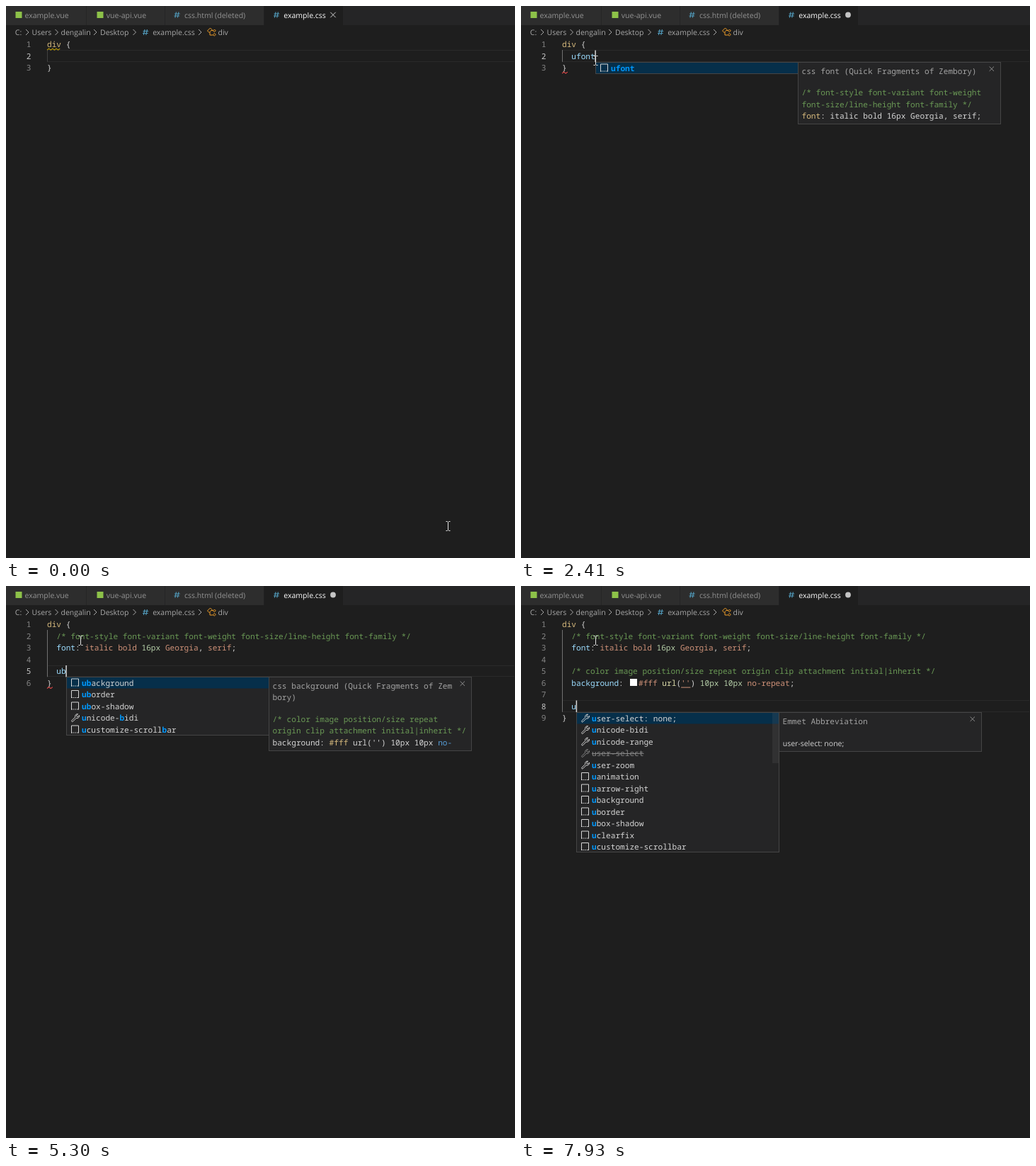
Animation, 719 px wide and 779 px high, one loop 8 s. Source, as an HTML page:

```html
<!DOCTYPE html>
<html lang="en">
<head>
<meta charset="utf-8">
<title>Snippet completion</title>
<style>
html, body { margin: 0; width: 100%; height: 100%; overflow: hidden; background: #1e1e1e; }
svg { display: block; width: 100vw; height: 100vh; }
text { white-space: pre; text-rendering: geometricPrecision; font-weight: 500; }
.ui { font-family: "Open Sans", "Noto Sans", sans-serif; font-size: 10.5px; }
.code { font-family: "Noto Sans Mono", "DejaVu Sans Mono", monospace; font-size: 11.13px; }
.hit { fill: #0097fb; font-weight: bold; }
.line { fill: none; stroke-width: 1; }
</style>
</head>
<body>
<svg viewBox="0 0 719 779">
  <rect width="719" height="779" fill="#1e1e1e"/>
  <rect width="719" height="27" fill="#252526"/>
  <path d="M0 0H113V27H0ZM114 0H224V27H114ZM225 0H364V27H225Z" fill="#2d2d2d"/>
  <rect x="364.5" width="111.5" height="27" fill="#1e1e1e"/>
  <g fill="#8dc149">
    <rect x="13.5" y="8" width="9" height="9"/>
    <rect x="128.5" y="8" width="9" height="9"/>
  </g>
  <g id="chrome"></g>
  <g id="editor"></g>
  <path id="mouse" class="line" stroke="#e4e4e4" d="M-3 -6.5H-.8M.8 -6.5H3M0 -6V6M-3 6.5H-.8M.8 6.5H3"/>
</svg>
<script>
const CW = 6.678, LH = 16.5, LEFT = 58, LOOP = 8000;
const $ = id => document.getElementById(id);
const color = {
  sel: '#d7ba7d', txt: '#d4d4d4', prop: '#9cdcfe', com: '#6a9955',
  val: '#ce9178', num: '#b5cea8', fn: '#dcdcaa', key: '#569cd6', dim: '#a3a3a3'
};
const top_ = row => 45.8 + LH * (row - 1);
const colX = col => LEFT + col * CW;
const size = tokens => tokens.reduce((n, [, s]) => n + s.length, 0);

const label = (x, y, s, fill) => `<text class="ui" x="${x}" y="${y}" fill="${fill}">${s}</text>`;
const code = (x, y, tokens) => `<text class="code" x="${x}" y="${y}">` +
  tokens.map(([c, s]) => `<tspan fill="${color[c] || c}">${s}</tspan>`).join('') + '</text>';
const box = (x, y, w, h, fill, stroke = 'none') =>
  `<rect x="${x}" y="${y}" width="${w}" height="${h}" fill="${fill}" stroke="${stroke}"/>`;
const line = (d, stroke, more = '') => `<path class="line" d="${d}" stroke="${stroke}" ${more}/>`;
const cross = (x, y, r, stroke) =>
  line(`M${x - r} ${y - r}L${x + r} ${y + r}M${x + r} ${y - r}L${x - r} ${y + r}`, stroke);
const hash = (x, y) => line(`M${x - 1} ${y - 4}l-1.6 8M${x + 2.4} ${y - 4}l-1.6 8M${x - 3.4} ${y - 1.5}h7.6M${x - 4} ${y + 1.5}h7.6`,
  '#519aba', 'style="stroke-width:1.2"');

function squiggle(row, cols, stroke) {
  const y = top_(row) + 16.3;
  let d = `M${LEFT} ${y}`;
  for (let x = 2.6, up = 1; x <= cols * CW; x += 2.6, up = !up) d += `L${LEFT + x} ${y - (up ? 2 : 0)}`;
  return line(d, stroke, 'style="stroke-width:1.1"');
}

// Tabs and breadcrumbs
const grey = '#949494', crumb = '#a9a9a9';
$('chrome').innerHTML =
  label(26.5, 16.5, 'example.vue', grey) + label(141.8, 16.5, 'vue-api.vue', grey) +
  label(252, 16.5, 'css.html (deleted)', grey) + label(392.3, 16.5, 'example.css', '#fff') +
  hash(241.5, 12.5) + hash(382, 12.5) + hash(197, 37) +
  [[12.8, 'C:'], [36.5, 'Users'], [77.5, 'dengalin'], [133, 'Desktop'], [207.2, 'example.css'], [299.5, 'div']]
    .map(([x, s]) => label(x, 40.8, s, crumb)).join('') +
  [28, 69.5, 124, 179.5, 272].map(x => line(`M${x} 33l4 4l-4 4`, crumb)).join('') +
  line('M284.5 35l4 -4l2.5 2.5l-4 4zM290 34.5h2.5M288 37v4h4.5M292.5 35l2 -2l1.8 1.8l-2 2zM292.5 40.5l2 -2l1.8 1.8l-2 2z', '#ee9d28');

// Document lines
const word = s => [['prop', s]];
const note = s => [['com', `/* ${s} */`]];
const fontNote = note('font-style font-variant font-weight font-size/line-height font-family');
const fontRule = [['prop', 'font'], ['txt', ':'], ['val', ' italic bold'], ['num', ' 16px'],
  ['val', ' Georgia'], ['txt', ','], ['val', ' serif'], ['txt', ';']];
const bgNote = note('color image position/size repeat origin clip attachment initial|inherit');
const bgName = [['prop', 'background'], ['txt', ': ']];
const bgValue = [['val', '#fff'], ['fn', ' url'], ['txt', '('], ['val', "''"], ['txt', ')'],
  ['num', ' 10px 10px'], ['val', ' no-repeat'], ['txt', ';']];
const bgRule = [...bgName, ...bgValue];
const one = [fontNote, fontRule];
const two = [...one, [], bgNote, bgRule];

// Completion lists, keyed by the typed word
const lists = {
  u: ['user-select: none;', 'unicode-bidi', 'unicode-range', 'user-select', 'user-zoom', 'uanimation',
    'uarrow-right', 'ubackground', 'uborder', 'ubox-shadow', 'uclearfix', 'ucustomize-scrollbar'],
  uf: ['ufont', 'uclearfix'], ufo: ['ufont'], ufon: ['ufont'], ufont: ['ufont'],
  ub: ['ubackground', 'uborder', 'ubox-shadow', 'unicode-bidi', 'ucustomize-scrollbar'],
  uba: ['ubackground', 'ucustomize-scrollbar'], ubac: ['ubackground'], uback: ['ubackground']
};
const docs = {
  emmet: { h: 55, title: ['Emmet Abbreviation'], plain: 'user-select: none;' },
  font: { h: 87, title: ['css font (Quick Fragments of Zembory)'], body: [
    [['com', '/* font-style font-variant font-weight']],
    [['com', 'font-size/line-height font-family */']],
    [['sel', 'font'], ['txt', ': italic bold 16px Georgia, serif;']]] },
  bg: { h: 104, title: ['css background (Quick Fragments of Zem', 'bory)'], body: [
    [['com', '/* color image position/size repeat']],
    [['com', 'origin clip attachment initial|inherit */']],
    [['txt', 'background: '], ['sel', '#fff'], ['txt', " url('') 10px 10px "], ['key', 'no-']]] }
};
const wrench = 'M1 9.7L5.7 5A3.4 3.4 0 0 1 9.6 .7L7.7 2.6L8.1 4.1L9.6 4.5L11.5 2.6A3.4 3.4 0 0 1 7.2 6.5L2.5 11.2A1 1 0 0 1 1 9.7Z';
const frame = 'M.5 11V.5H10.5V11M0 10.5h2M3 10.5h1.5M5.7 10.5h1.5M8.4 10.5h2';

function mark(s, query) {
  let i = 0;
  return [...s].map(c => c === query[i] ? (i++, `<tspan class="hit">${c}</tspan>`) : c).join('');
}

function popup(x, y, query) {
  const items = lists[query];
  const h = Math.round(items.length * LH - .6);
  let out = box(x, y, 286, h, '#252526') + box(x, y, 286, 16, '#062f4a') + box(x, y, 286, h, 'none', '#454545');
  items.forEach((s, i) => {
    const ry = y + i * LH, tool = /^u[sn]/.test(s), old = s === 'user-select';
    const ink = old ? '#858585' : '#d4d4d4';
    out += `<g transform="translate(${x + 6.5} ${ry + 2})">${line(tool ? wrench : frame, ink)}</g>`;
    out += `<text class="code" x="${x + 21.5}" y="${ry + 12.2}" fill="${ink}"` +
      `${old ? ' text-decoration="line-through"' : ''}>${old ? s : mark(s, query)}</text>`;
  });
  if (items.length > 11) out += box(x + 276.5, y + .5, 9, 71, 'rgba(121,121,121,.14)');
  return out;
}

function details(x, y, { h, title, body = [], plain }, bar) {
  let out = box(x, y, 286, h, '#252526', '#454545');
  title.forEach((s, i) => out += code(x + 5, y + 16 + i * LH, [['dim', s]]));
  const by = y + 46.6 + (title.length - 1) * LH;
  body.forEach((t, i) => out += code(x + 5, by + i * LH, t));
  if (plain) out += label(x + 5.2, y + 47.5, plain, color.txt);
  if (bar) out += box(x + 277, y + .5, 8.5, 88, 'rgba(121,121,121,.45)');
  return out + cross(x + 273.3, y + 9.2, 3.2, '#8c8c8c');
}

// Each step changes part of the editor state; the last body line is the active one
const steps = [
  [0, { body: [[]], caret: 0, warn: 1, err: 0, dirty: 0, list: '', doc: '', bar: 0, swatch: 0 }],
  [680, { caret: 1 }], [1150, { caret: 0 }], [1700, { caret: 1 }],
  [1870, { body: [word('u')], dirty: 1 }],
  [2020, { list: 'u', doc: 'emmet' }],
  [2100, { body: [word('uf')] }],
  [2180, { list: 'uf', doc: 'font' }],
  [2260, { body: [word('ufo')], list: 'ufo' }],
  [2330, { body: [word('ufon')], list: 'ufon', warn: 0, err: 1 }],
  [2410, { body: [word('ufont')], list: 'ufont' }],
  [2580, { body: one, list: '', doc: '' }],
  [3040, { caret: 0 }], [3270, { err: 0 }],
  [3420, { body: [...one, []], caret: 1 }],
  [3730, { body: [...one, [], []] }],
  [4200, { caret: 0 }],
  [4600, { body: [...one, [], word('u')], caret: 1 }],
  [4750, { list: 'u' }], [4830, { doc: 'emmet' }],
  [5070, { caret: 0, err: 1 }],
  [5300, { body: [...one, [], word('ub')], caret: 1, list: 'ub', doc: 'bg' }],
  [5380, { body: [...one, [], word('uba')], list: 'uba' }],
  [5530, { body: [...one, [], word('ubac')], list: 'ubac' }],
  [5680, { body: [...one, [], word('uback')], list: 'uback' }],
  [5760, { bar: 1 }],
  [6070, { body: two, list: '', doc: '', bar: 0 }],
  [6540, { caret: 0 }], [6690, { swatch: 1 }], [6770, { err: 0 }],
  [6850, { body: [...two, []], caret: 1 }],
  [7150, { body: [...two, [], []] }],
  [7610, { caret: 0 }],
  [7780, { body: [...two, [], word('u')], caret: 1 }],
  [7930, { list: 'u', doc: 'emmet' }]
];
let last = {};
const states = steps.map(([t, change]) => [t, last = { ...last, ...change }]);

// Pointer glides in, overshoots slightly and settles
const moves = [[0, 624.5, 734]];
[70, 150, 230, 300, 380, 460].forEach((t, i) => {
  const k = (i + 1) / 6, p = k * k * (3 - 2 * k);
  moves.push([t, 624.5 - 519 * p, 734 - 657 * p]);
});
moves.push([530, 110.5, 80], [680, 107.5, 78], [770, 105.5, 77]);

function draw(s) {
  const row = s.body.length + 1, end = row + 1, active = s.body[row - 2];
  const ty = top_(row), cx = colX(2 + size(active));
  let out = line(`M58 ${Math.round(ty) + .5}H718M58 ${Math.round(ty + LH) - .5}H718`, '#2a2a2a');
  out += box(58, 62, 1, ty + LH - 62, s.dirty ? '#707070' : '#404040');
  for (let n = 1; n <= end; n++)
    out += code(28.8, top_(n) + 12.3, [[n === row ? '#c6c6c6' : '#858585', String(n)]]);
  out += code(LEFT, top_(1) + 12.3, [['sel', 'div'], ['txt', ' {']]);
  s.body.forEach((t, i) => {
    const y = top_(i + 2) + 12.3;
    if (t !== bgRule || !s.swatch) return out += code(colX(2), y, t);
    const x = colX(14) + 14.5;
    out += code(colX(2), y, bgName) + box(154, y - 9.6, 10, 10, '#fff') +
      code(x, y, bgValue) + box(x + 9 * CW, y + 2, 2 * CW, 1, color.val);
  });
  out += code(LEFT, top_(end) + 12.3, [['txt', '}']]);
  if (s.warn) out += squiggle(1, 3, '#cca700');
  if (s.err) out += squiggle(end, 1.2, '#f14c4c');
  if (s.caret) out += box(cx - .4, ty + .2, 1.5, LH, '#d8d8d8');
  const px = Math.round(cx) + .5, py = Math.round(top_(end) - .3) + .5;
  if (s.list) out += popup(px, py, s.list);
  if (s.doc) out += details(px + 286, py, docs[s.doc], s.bar);
  out += s.dirty ? '<circle cx="462" cy="12.5" r="3.9" fill="#c5c5c5"/>' : cross(462, 12.5, 3.7, '#d0d0d0');
  $('editor').innerHTML = out;
}

const at = (table, t) => table.findLast(e => e[0] <= t);
const start = performance.now();
let shown;
function tick() {
  const t = (performance.now() - start) % LOOP;
  const state = at(states, t)[1];
  if (state !== shown) draw(shown = state);
  const [, x, y] = at(moves, t);
  $('mouse').setAttribute('transform', `translate(${x} ${y})`);
  requestAnimationFrame(tick);
}
tick();
</script>
</body>
</html>
```
